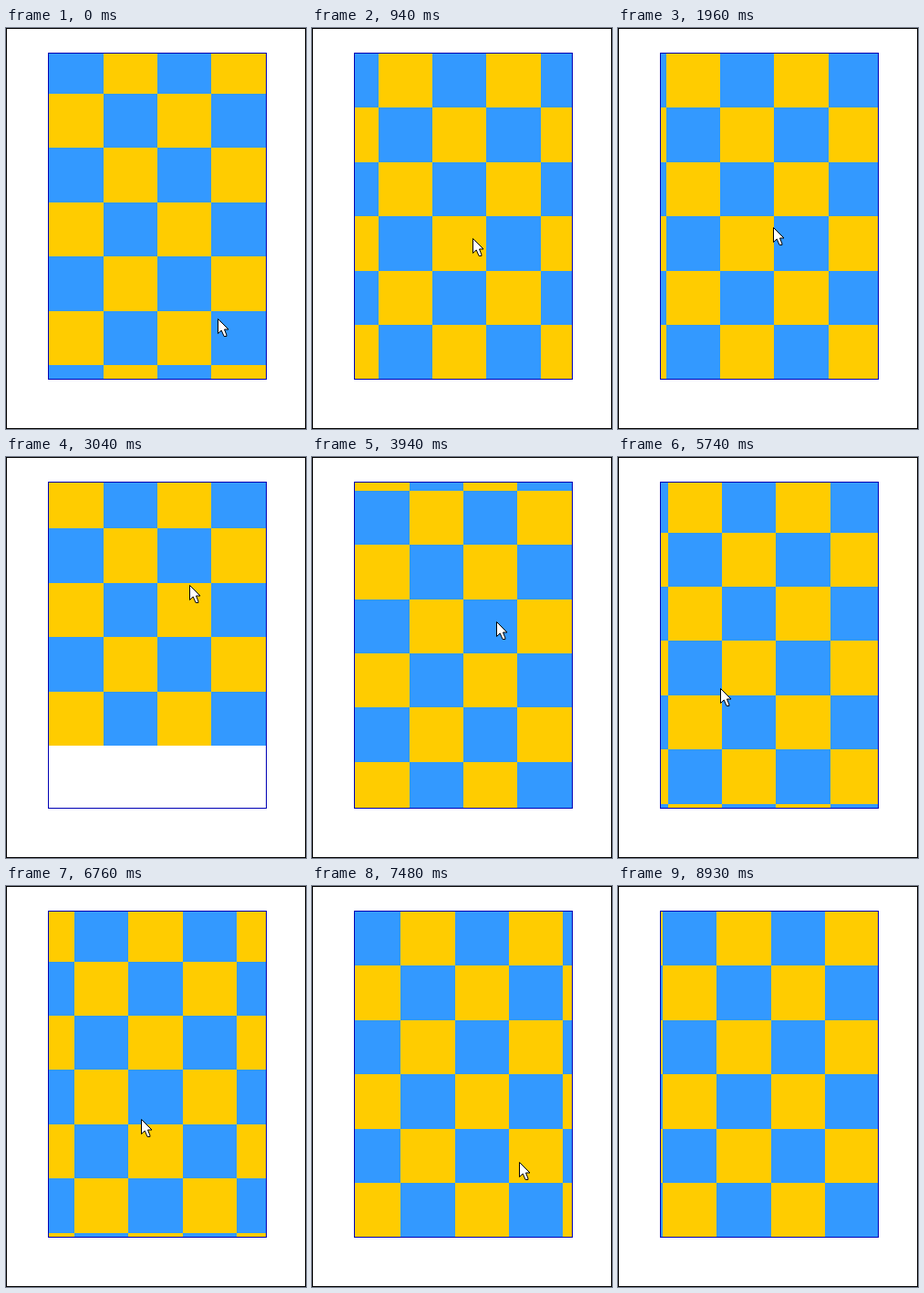
Recreate the animation shown at these times as an HTML page with a canvas. Size 329 by 439 pixels, loop 8990 ms.

```html
<!DOCTYPE html>
<html lang="en">
<head>
<meta charset="utf-8">
<title>Draggable checkerboard</title>
<style>
  html, body { margin: 0; width: 100%; height: 100%; overflow: hidden; background: #fff; }
  canvas { display: block; }
</style>
</head>
<body>
<canvas id="stage" width="329" height="439"></canvas>
<script>
const ctx = document.getElementById('stage').getContext('2d');
const LOOP = 8990, CELL = 59.4, COLS = 7, ROWS = 9;
const VIEW = { x: 47.2, y: 27.9 };

const linear = p => p;
const smooth = p => p * p * (3 - 2 * p);
const speedUp = p => p * p;
const slowDown = p => 1 - (1 - p) ** 3;

// Each key: time, x, y, easing used to arrive there
const board = [
  [0, 0, -74.7],
  [400, 0, -74.7],
  [700, -20, -128, speedUp],
  [940, -34.1, -178.2, linear],
  [1600, -54, -178.2, slowDown],
  [2080, -54, -178.2],
  [2300, -22, -178.2, smooth],
  [2620, 0, -178.2, slowDown],
  [2680, 0, -178.2],
  [3040, 0, -246.5, smooth],
  [3160, 0, -262, slowDown],
  [3580, 0, -178.2, slowDown],
  [3640, 0, -178.2],
  [3880, 0, -110, speedUp],
  [4180, 0, 12, slowDown],
  [4600, 0, 0, slowDown],
  [5200, 0, 0],
  [5620, -100, -4.8, smooth],
  [5740, -111.5, -4.8, linear],
  [6460, -178.2, -4.8, slowDown],
  [6580, -178.2, -4.8],
  [6760, -150.4, -4.8, speedUp],
  [7000, -108, -3, linear],
  [7240, -86, 0, linear],
  [8140, -57.6, 0, slowDown],
];

const pointer = [
  [0, 232, 318],
  [40, 232, 318],
  [280, 223, 308, smooth],
  [400, 223, 308],
  [700, 198, 262, speedUp],
  [940, 176, 230, slowDown],
  [1720, 176, 230],
  [2080, 168, 214, smooth],
  [2320, 202, 210, smooth],
  [2680, 201, 208, smooth],
  [3040, 201, 140, smooth],
  [3160, 201, 124, slowDown],
  [3640, 200, 112, smooth],
  [3880, 202, 180, speedUp],
  [4720, 202, 180],
  [4780, 202, 182, linear],
  [5200, 223, 258, smooth],
  [5620, 123, 253, smooth],
  [5740, 112, 253, slowDown],
  [6580, 112, 254],
  [6760, 148, 255, speedUp],
  [7000, 190, 256, linear],
  [7540, 228, 304, smooth],
  [8510, 228, 304],
  [8870, 257, 306, smooth],
];

function at(keys, t) {
  const i = keys.findIndex(k => k[0] > t);
  if (i < 0) return keys.at(-1).slice(1, 3);
  const [t0, x0, y0] = keys[i - 1];
  const [t1, x1, y1, ease = linear] = keys[i];
  const p = ease((t - t0) / (t1 - t0));
  return [x0 + (x1 - x0) * p, y0 + (y1 - y0) * p];
}

function snap(t) {
  if (t < 100) return 0;
  const start = t < 8570 ? 100 : 8570;
  return start + Math.floor((t - start) / 60) * 60;
}

function drawBoard([x, y]) {
  const left = c => Math.round(VIEW.x + x + c * CELL);
  const top = r => Math.round(VIEW.y + y + r * CELL);
  ctx.save();
  ctx.beginPath();
  ctx.rect(47, 28, 238, 356);
  ctx.clip();
  for (let r = 0; r < ROWS; r++) {
    for (let c = 0; c < COLS; c++) {
      ctx.fillStyle = (r + c) % 2 ? '#3399ff' : '#ffcc00';
      ctx.fillRect(left(c), top(r), left(c + 1) - left(c), top(r + 1) - top(r));
    }
  }
  ctx.restore();
}

const arrow = new Path2D('M0 0V16L3.7 12.5L6.6 19H9.4V17.5L7 11.5H11.5Z');

function drawPointer([x, y]) {
  ctx.save();
  ctx.translate(Math.round(x) + 0.5, Math.round(y) + 0.5);
  ctx.fillStyle = '#fff';
  ctx.strokeStyle = '#000';
  ctx.fill(arrow);
  ctx.stroke(arrow);
  ctx.restore();
}

function outline(color, x, y, w, h) {
  ctx.strokeStyle = color;
  ctx.strokeRect(x + 0.5, y + 0.5, w - 1, h - 1);
}

function draw(t) {
  ctx.fillStyle = '#fff';
  ctx.fillRect(0, 0, 329, 439);
  outline('#000', 0, 0, 329, 439);
  drawBoard(at(board, t));
  outline('#0000b4', 46, 27, 240, 358);
  if (t < 8930) drawPointer(at(pointer, t));
}

const begin = performance.now();
function frame() {
  draw(snap((performance.now() - begin) % LOOP));
  requestAnimationFrame(frame);
}
frame();
</script>
</body>
</html>
```
